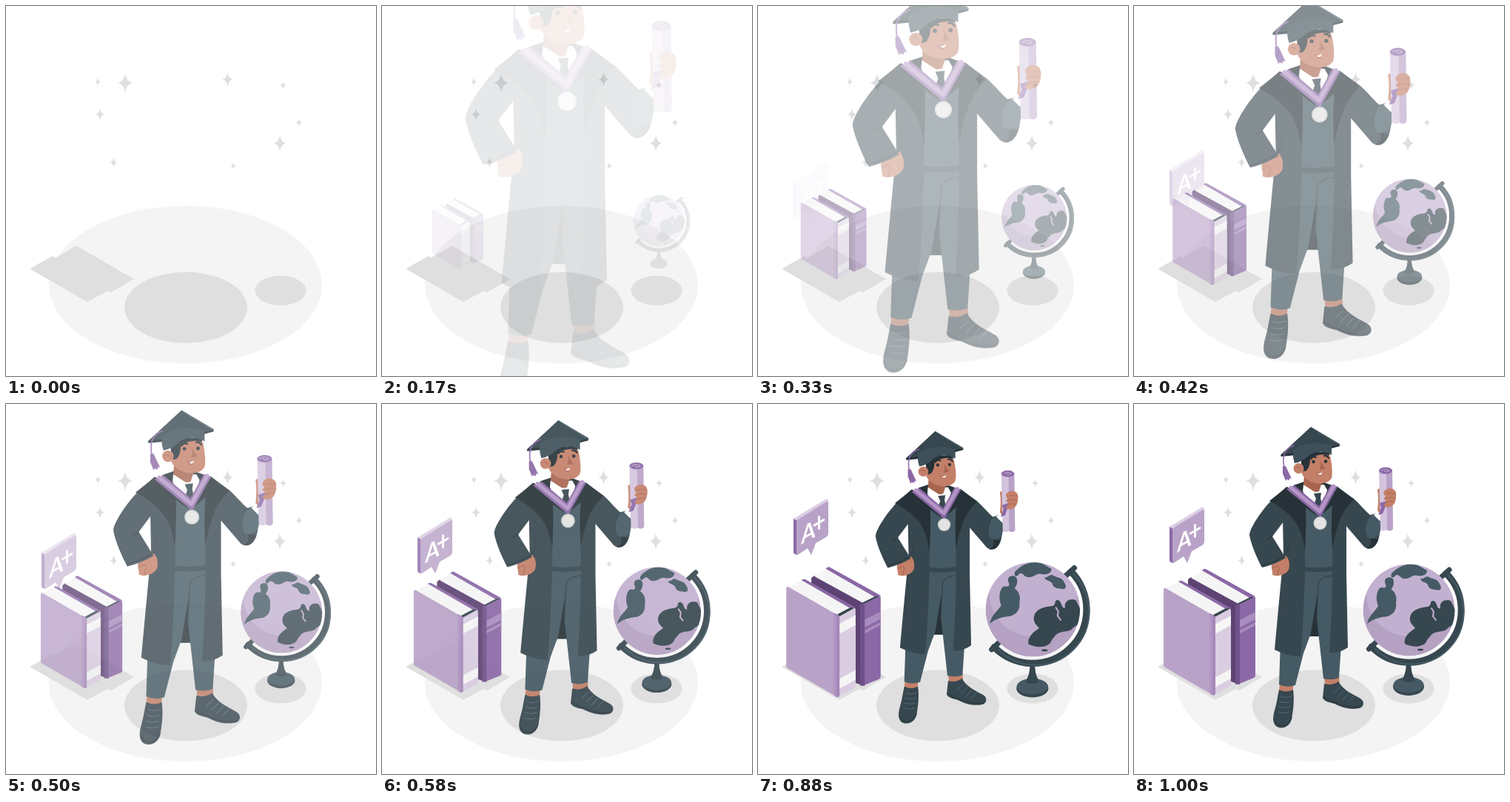
Recreate the animation shown at these times as an HTML page. Size 500x500 px, loop 1040 ms.

```html
<!DOCTYPE html>
<html lang="en">
<head>
<meta charset="utf-8">
<title>Graduate</title>
<style>
html, body { margin: 0; width: 100%; height: 100%; overflow: hidden; background: #fff; }
svg { display: block; width: 100vw; height: 100vh; }
.n { fill: #37474f; } .d { fill: #263238; } .g { fill: #455a64; }
.p { fill: #8b68a6; } .m { fill: #b9a2c8; } .l { fill: #dacde2; } .k { fill: #5d4373; }
.w { fill: #f5f5f5; } .s { fill: #c37f68; } .t { fill: #a7654f; }
.o { fill: none; stroke-linecap: round; stroke-linejoin: round; }
text { font: bold 33px Lato, Arial, sans-serif; fill: #fff; }
</style>
</head>
<body>
<svg viewBox="0 0 500 500">
  <ellipse cx="242.5" cy="376.5" rx="184.5" ry="106.5" fill="#f4f4f4"/>
  <g fill="#dfdfdf">
    <path d="M32 355L63 338L67 340L95 324L173 369L142 387L137 385L110 400z"/>
    <ellipse cx="243" cy="407.5" rx="83" ry="48"/>
    <ellipse cx="371" cy="384.5" rx="34.5" ry="20"/>
    <path id="stars"/>
  </g>

  <g id="badge">
    <path class="l" d="M48 166L91 140Q94 138 95 142L53 169z"/>
    <path class="p" d="M48 166L53 169V215L50 214Q48 213 48 210z"/>
    <path class="m" d="M52 170Q52 168 54 167L93 143Q95 142 95 144V186Q95 189 92 191L78 199L72 215L67 206L55 214Q52 216 52 213z"/>
    <text transform="matrix(.84 -.46 -.04 1 58 201)">A</text>
    <path class="o" stroke="#fff" stroke-width="2.800" stroke-linecap="butt" d="M76 175L89 167.500M82.500 163.500V179.500"/>
  </g>

  <g id="books">
    <path class="k" d="M73 237L77 234L143 270V379L131 375V300L73 260z"/>
    <path class="w" d="M77 235L93 225L160 261L141 270z"/>
    <path class="p" d="M92 225Q94 222 97 223L164 260L158 263z"/>
    <path class="n" d="M139 270L157 261L164 261L143 271z"/>
    <path class="p" d="M140 272L162 261Q164 260 164 263V367Q164 369 162 370L140 379z"/>
    <path fill="#a88cbf" d="M143 292L164 281V291L143 302zM143 306L164 295V299L143 310z"/>
    <path fill="#6e5189" d="M137 272L143 270V378L137 379z"/>
    <path class="w" d="M44 249L61 240L129 277L107 287z"/>
    <path class="p" d="M60 240Q62 238 65 239L131 276L126 278z"/>
    <path class="n" d="M107 285L124 276L131 277L110 288z"/>
    <path class="l" d="M109 288L129 277Q131 276 131 279V379Q131 381 129 382L109 393z"/>
    <path class="w" d="M109 298L131 286V299L109 311zM109 370L131 358V371L109 383z"/>
    <path class="m" d="M40 251Q40 248 43 249L104 284Q106 285 106 288V393L42 356Q40 355 40 353z"/>
    <path fill="#a588b9" d="M102 283Q107 284 110 288V392Q108 395 105 393L102 391z"/>
    <path fill="#b195c2" d="M102 285L106 287V393L102 391z"/>
  </g>

  <g id="globe">
    <path class="n" d="M368 350H374Q374 365 380 372H362Q368 365 368 350z"/>
    <ellipse class="n" cx="371" cy="382" rx="21" ry="12"/>
    <ellipse class="g" cx="371" cy="379.500" rx="20.500" ry="10.500"/>
    <path class="n" d="M368 352H374Q375 368 380 374Q371 378 362 374Q367 368 368 352z"/>
    <g class="o" stroke="#37474f">
      <path stroke-width="9" d="M422 229A70.500 70.500 0 0 1 321 328"/>
      <path stroke-width="7" d="M414 235L426 224M317.500 331L327 322"/>
      <path stroke="#455a64" stroke-width="2" d="M425 232A70 70 0 0 1 326 331"/>
    </g>
    <clipPath id="ball"><circle cx="371.500" cy="278.500" r="62"/></clipPath>
    <g clip-path="url(#ball)">
      <circle cx="371.500" cy="278.500" r="62" fill="#b5a1c2"/>
      <circle cx="372" cy="256" r="58" fill="#c2b0d0"/>
      <path class="g" d="M340 236C346 232 352 235 351 242C351 247 347 250 348 251C353 254 356 262 354 268C355 276 353 283 343 287C334 288 325 289 315 297C317 286 326 280 330 273C327 266 327 256 331 250C334 246 340 250 340 247C342 243 337 243 340 236z"/>
      <path class="g" d="M348 229C358 218 370 215 382 217L396 225C396 231 390 233 383 232C376 230 374 236 367 236C360 237 360 230 354 231C351 236 346 236 348 229z"/>
      <path class="g" d="M387 236C393 237 393 231 399 234C404 237 410 236 413 243C417 250 414 253 408 251C402 251 398 249 397 244C394 240 388 241 387 236z"/>
      <path class="n" d="M373 288C375 278 386 275 397 274C404 271 398 266 405 266C410 268 409 278 414 276C412 268 420 263 428 266L436 282V293C432 299 426 300 422 305C415 309 405 306 400 314Q397 317 394 323C386 330 374 328 366 324C364 315 372 308 380 303C376 298 372 296 373 288z"/>
      <path class="o" stroke="#c2b0d0" stroke-width="2" d="M402 276L405 281L404 287L408 292"/>
      <ellipse class="n" cx="387" cy="332" rx="4" ry="1.500"/>
    </g>
  </g>

  <g id="man">
    <!-- shoes and ankles -->
    <path class="s" d="M197 376H216L214 391H196zM257 367H277L278 379H258z"/>
    <path class="n" d="M196 386Q206 391 215 386C217 400 215 415 213 426C210 436 202 439 195 437C187 434 187 424 190 414C193 404 194 395 196 386z"/>
    <path class="n" d="M257 378Q268 381 276 375C284 388 296 392 306 398C312 402 311 409 305 411C290 414 279 409 271 405C263 403 257 402 255 397z"/>
    <g class="o" stroke="#566b76">
      <path d="M198 395Q205 398 213 395M197 402Q205 405 212 402M196 409Q204 412 211 409M195 416Q203 419 210 416M269 391L278 383M275 396L284 387M282 400L290 391M289 403L297 394"/>
      <path stroke="#263238" d="M189 426Q192 435 201 435Q210 433 213 424M256 396Q266 402 276 405Q290 411 306 409"/>
    </g>
    <!-- gown lining, trousers and vest -->
    <path class="d" d="M230 225H270L262 314H226z"/>
    <path class="g" d="M231 220H269L280 325L277 370Q267 374 256 371L247 290L249 250L239 310L229 337L218 380Q206 384 196 379L198 320z"/>
    <path class="g" d="M229 118H271V222Q250 226 229 222z"/>
    <path class="n" d="M230 220Q250 223 270 219V225Q250 229 230 226z"/>
    <path class="o" stroke="#37474f" stroke-width="1.500" d="M268 232Q252 233 249 243L247 290"/>
    <!-- gown panels -->
    <path class="n" d="M206 112L186 130L201 155L202 205Q197 255 190 332Q207 341 225 341Q229 300 231 226L232 135z"/>
    <path class="n" d="M274 112L300 135L287 164V230L289 329Q278 337 264 336Q268 280 268 225V135z"/>
    <path class="o" stroke="#2f3e45" d="M203 205Q211 200 208 184"/>
    <!-- sleeves -->
    <path class="s" d="M186 217L205 205C210 209 211 218 209 224C205 231 194 234 187 231C188 227 185 222 186 217z"/>
    <path class="o" stroke="#a7654f" d="M188 222L193 219Q198 220 195 225L194 231"/>
    <path class="n" d="M186 130C174 142 157 166 156 177C158 190 167 210 173 221Q190 217 205 208L187 179L202 159L200 130z"/>
    <path class="o" stroke="#263238" d="M187 179L180 183M173 218Q188 215 202 206"/>
    <path class="n" d="M276 113L297 128C305 135 312 144 319 150L327 148C333 156 334 172 330 184C326 195 318 198 311 193L286 164z"/>
    <path class="d" d="M318 153Q309 169 316 181L330 183Q325 198 314 195Q323 191 320 182L313 176z"/>
    <path class="g" d="M328 147C336 158 334 170 331 177Q324 183 316 181Q309 169 318 153z"/>
    <path fill="#fff" d="M324 150L331 144L337 152L332 158z"/>
    <!-- hood -->
    <path class="d" d="M207 112L183 131Q210 146 219 161Q228 174 231 198Q233 165 232 140L246 150L250 140z"/>
    <path class="d" d="M274 111L297 129Q281 145 276 163Q271 177 268 195Q266 165 268 137L254 149L251 138z"/>
    <!-- neck, shirt, tie and stole -->
    <path class="d" d="M215 110L230 105L257 106L268 110L251 146z"/>
    <path class="w" d="M229 109L257 109L258 127L251 142L229 122z"/>
    <path class="t" d="M230 95L229 110Q238 121 250 118L254 106z"/>
    <path fill="#fff" d="M229 109L246 120L238 128L228 118zM257 109L250 120L258 127L261 116z"/>
    <path class="n" d="M243 121L253 120L252 127L255 141L250 146L243 137L246 128z"/>
    <path class="p" d="M206 115L217 110L250 138L266 109L275 112L252 153z"/>
    <path class="o" stroke="#b396c6" stroke-width="5" stroke-linecap="butt" stroke-linejoin="miter" d="M212 113L251 145L270 111"/>
    <circle cx="251.500" cy="161" r="9" fill="#cfcfcf"/>
    <circle cx="251.500" cy="161" r="7.500" fill="#e3e3e3"/>
    <!-- head -->
    <path class="d" d="M226 66L264 64V72L240 76L234 92L228 91Q225 80 226 66z"/>
    <circle class="s" cx="222.500" cy="87" r="7"/>
    <path class="o" stroke="#a7654f" d="M219 86Q222 83 225 88"/>
    <path class="s" d="M238 74Q252 65 265 70C267 80 269 92 267 100C263 108 250 109 242 106C234 104 228 98 226 92L233 90Q238 85 238 74z"/>
    <path class="t" d="M251 76L258 87Q256 89 250 88Q254 84 251 76z"/>
    <g class="d"><circle cx="242.500" cy="78" r="2.200"/><circle cx="259" cy="77.500" r="2.200"/></g>
    <path class="o" stroke="#263238" stroke-width="2.200" d="M239 74Q242 70 246 72M257 70Q261 69 263 73"/>
    <path fill="#fff" d="M247 94Q251 95 254 92L253 96Q249 97 247 94z"/>
    <path class="o" stroke="#a34a45" d="M247 93Q249 98 253 96"/>
    <!-- cap and tassel: the board leans back behind the band -->
    <path class="d" d="M198 69L239 31L278 54V57L240 67L199 71z"/>
    <path class="n" d="M199 68L239 32L277 55L240 64z"/>
    <path class="o" stroke="#566b76" d="M240 32L277 55"/>
    <path fill="#3e5059" d="M215 62Q236 47 267 56L267 69Q251 60 237 69Q228 78 217 80Q214 71 215 62z"/>
    <path class="o" stroke="#8b68a6" stroke-width="1.500" d="M216 56Q198 62 203 86"/>
    <path class="p" d="M201 84H205L213 101L210 100V103L206 102L205 104L201 94z"/>
    <!-- scroll and hand -->
    <path class="s" d="M329 116Q333 111 334 121L347 114Q355 116 354 126Q353 137 345 140L335 150L329 144Q331 128 329 116z"/>
    <path fill="#d3c4dd" d="M331 90Q340 84 349 90L350 169Q347 173 342 170Q335 173 333 169z"/>
    <path class="m" d="M341 94L349 90L350 169Q347 173 342 170z"/>
    <ellipse class="p" cx="340" cy="90" rx="9" ry="4.500"/>
    <path class="o" stroke="#c2add0" d="M334 90Q340 86 345 90Q341 93 338 90"/>
    <path class="p" d="M332 134L350 128V132L340 138L336 148L330 150L334 140z"/>
    <path class="s" d="M338 118Q343 112 350 115Q355 117 354 125Q354 134 348 138Q342 142 337 137Q342 133 340 130Q335 128 340 125Q336 121 338 118z"/>
    <path class="o" stroke="#a7654f" stroke-width=".8" d="M341 121Q347 119 353 121M341 127Q347 125 353 127M341 133Q346 131 351 132"/>
  </g>
</svg>
<script>
const el = id => document.getElementById(id);

// x, y, half width, half height
const stars = [[124, 102.5, 4, 5.5], [161, 104, 9.5, 13], [299.5, 99, 7, 10],
  [374.5, 107, 4.5, 5.5], [127, 146.5, 6, 8], [396, 157.5, 4, 6],
  [370, 185.5, 8, 11], [145.5, 211.5, 5, 7], [307, 216, 4, 5]];
el('stars').setAttribute('d', stars.map(([x, y, w, h]) => {
  const a = w * .15, b = h * .15;
  return `M${x} ${y - h}Q${x + a} ${y - b} ${x + w} ${y}Q${x + a} ${y + b} ${x} ${y + h}` +
    `Q${x - a} ${y + b} ${x - w} ${y}Q${x - a} ${y - b} ${x} ${y - h}z`;
}).join(''));

function bezier(x1, y1, x2, y2) {
  const at = (a, b, u) => 3 * u * (1 - u) ** 2 * a + 3 * u * u * (1 - u) * b + u ** 3;
  return t => {
    if (t >= 1) return 1;
    let lo = 0, hi = 1;
    for (let i = 0; i < 24; i++) {
      const u = (lo + hi) / 2;
      if (at(x1, x2, u) < t) lo = u; else hi = u;
    }
    return at(y1, y2, lo);
  };
}
const zoomEase = bezier(.36, -.01, .5, 1.38);
const slideEase = bezier(.5, -.75, .55, 1.85);

function pose(id, transform, opacity) {
  el(id).setAttribute('transform', transform);
  el(id).setAttribute('opacity', Math.max(0, Math.min(1, opacity)));
}
function zoom(id, x, y, from, p) {
  const s = from + (1 - from) * p;
  pose(id, `translate(${x} ${y}) scale(${s}) translate(${-x} ${-y})`, p);
}

const LOOP = 1040, FPS = 24, LEAD = .018;
function draw(now) {
  // 24 steps a second; the stage stays empty for the first four
  const step = Math.floor((now % LOOP + 5) * FPS / 1000);
  const t = step < 4 ? 0 : step / FPS + LEAD;
  const p = zoomEase(t), q = slideEase(t);
  zoom('man', 255, 234.5, 1.5, p);
  zoom('books', 102.5, 308, .5, p);
  zoom('globe', 377.7, 305.2, .5, p);
  pose('badge', `translate(0 ${75 * (1 - q)})`, q);
}
const start = performance.now();
function tick() {
  draw(performance.now() - start);
  requestAnimationFrame(tick);
}
tick();
</script>
</body>
</html>
```
